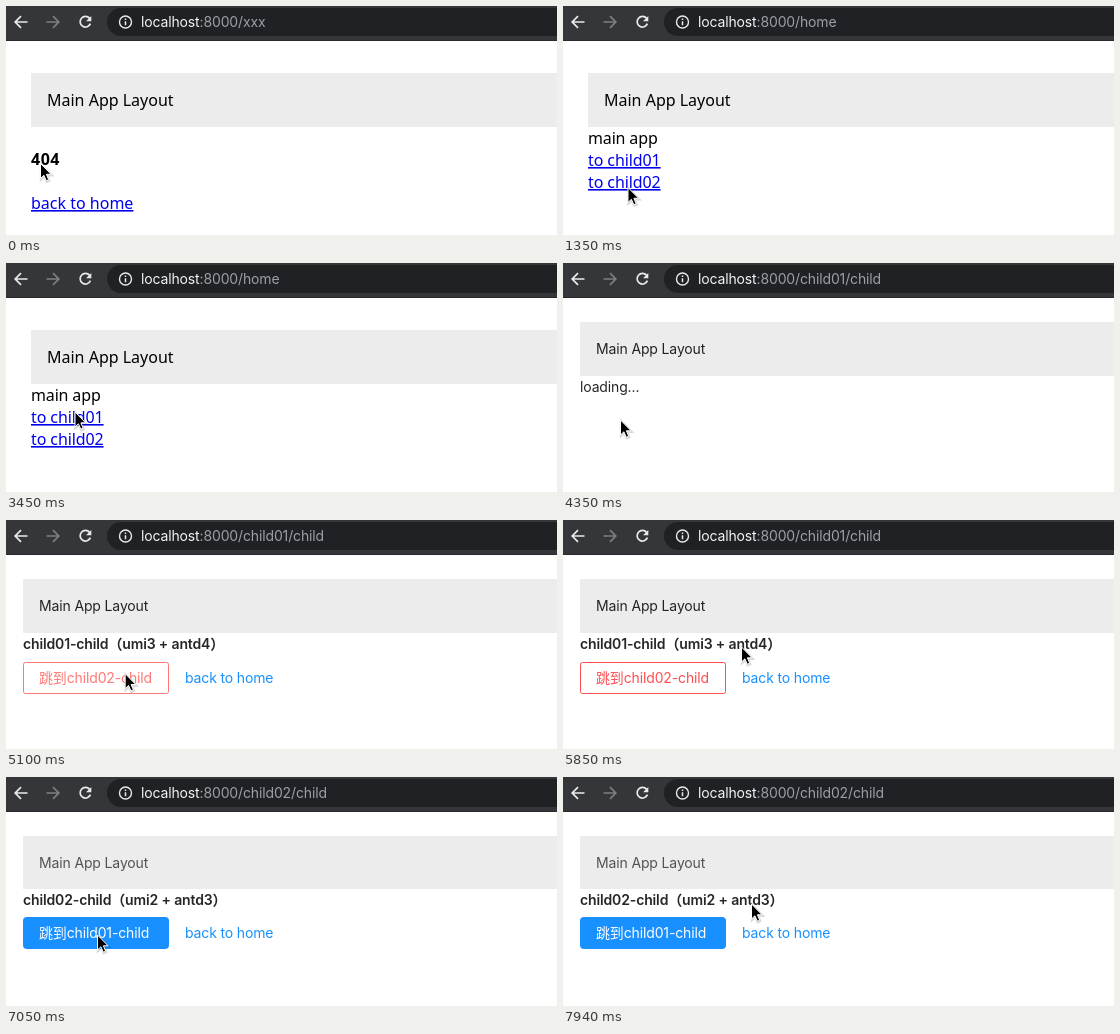
These frames come from a looping animation (551x229 px, 8 s). An HTML page:

```html
<!DOCTYPE html>
<html lang="en">
<head>
<meta charset="utf-8">
<title>Micro app navigation</title>
<style>
  html, body { margin: 0; width: 100%; height: 100%; overflow: hidden; background: #fff; }
  svg { display: block; width: 551px; height: 229px; }
  text { white-space: pre; }
  .plain { font: 16px "Noto Sans", "Open Sans", sans-serif; }
  .ui { font: 14px Inter, "Noto Sans CJK SC", "Noto Sans CJK", sans-serif; letter-spacing: -.14px; }
  .plain a, .link { fill: #00e; text-decoration: underline; }
  .bar { fill: #ececec; }
  .title { font-weight: 600; fill: rgba(0, 0, 0, .85); }
  .act { fill: #1890ff; }
  .act.hover { fill: #40a9ff; }
  .danger { --c: #ff4d4f; }
  .danger.hover { --c: #ff7875; }
  .danger rect { fill: #fff; stroke: var(--c); }
  .danger text { fill: var(--c); }
  .primary { --c: #1890ff; }
  .primary.hover { --c: #40a9ff; }
  .primary rect { fill: var(--c); }
  .primary text { fill: #fff; }
  .page { display: none; }
  .page.on { display: inline; }
  .icon { fill: none; stroke: #e8eaed; stroke-width: 1.7; }
</style>
</head>
<body>
<svg viewBox="0 0 551 229">
  <rect width="551" height="229" fill="#fff"/>

  <g id="toolbar">
    <rect width="551" height="35" fill="#35363a"/>
    <rect y="34" width="551" height="1" fill="#28292c"/>
    <rect x="101" y="2" width="480" height="28" rx="14" fill="#202124"/>
    <path class="icon" d="M21.5 16H9.5M15 10.2L9.2 16L15 21.8"/>
    <path class="icon" d="M40.5 16H52.5M47 10.2L52.8 16L47 21.8" style="stroke:#7d7e82"/>
    <path class="icon" d="M83.6 12.4A5.3 5.3 0 1 0 84.4 17.6"/>
    <path d="M85.3 10V15.2H80.1Z" fill="#e8eaed"/>
    <circle class="icon" cx="119.5" cy="16" r="6" style="stroke-width:1.4"/>
    <path class="icon" d="M119.5 15.2V19.2M119.5 12.6V14" style="stroke-width:1.5"/>
    <text class="ui" x="135" y="21" fill="#f1f3f4">localhost<tspan id="path" fill="#9aa0a6"></tspan></text>
  </g>

  <g id="missing" class="page plain">
    <rect class="bar" x="25" y="67" width="526" height="54"/>
    <text x="41" y="100">Main App Layout</text>
    <text x="25" y="159" font-weight="600" letter-spacing=".5">404</text>
    <text class="link" x="25" y="203">back to home</text>
  </g>

  <g id="home" class="page plain">
    <rect class="bar" x="25" y="67" width="526" height="54"/>
    <text x="41" y="100">Main App Layout</text>
    <text x="25" y="138" letter-spacing="-.15">main app</text>
    <text class="link" x="25" y="160" letter-spacing="-.1">to child01</text>
    <text class="link" x="25" y="182" letter-spacing="-.1">to child02</text>
  </g>

  <g id="wait" class="page plain">
    <rect class="bar" x="25" y="67" width="526" height="54"/>
    <text x="41" y="100">Main App Layout</text>
    <text x="25" y="138">loading...</text>
  </g>

  <g id="loading" class="page ui" fill="rgba(0,0,0,.85)">
    <rect class="bar" x="17" y="59" width="534" height="54"/>
    <text x="33" y="91">Main App Layout</text>
    <text x="17" y="129">loading...</text>
  </g>

  <g id="child01" class="page ui" fill="rgba(0,0,0,.85)">
    <rect class="bar" x="17" y="59" width="534" height="54"/>
    <text x="33" y="91">Main App Layout</text>
    <text class="title" x="17" y="129">child01-child（umi3 + antd4）</text>
    <g class="danger" data-hit="17 142 163 174">
      <rect x="17.5" y="142.5" width="145" height="31" rx="2"/>
      <text x="33" y="163">跳到child02-child</text>
    </g>
    <text class="act" data-hit="179 148 267 168" x="179" y="163">back to home</text>
  </g>

  <g id="child02" class="page ui" fill="rgba(0,0,0,.65)">
    <rect class="bar" x="17" y="59" width="534" height="53"/>
    <text x="33" y="91">Main App Layout</text>
    <text class="title" x="17" y="128">child02-child（umi2 + antd3）</text>
    <g class="primary" data-hit="17 140 163 172">
      <rect x="17" y="140" width="146" height="32" rx="4"/>
      <text x="33" y="161">跳到child01-child</text>
    </g>
    <text class="act" data-hit="179 146 267 166" x="179" y="161">back to home</text>
  </g>

  <g id="cursor">
    <path d="M0 0V15L3.4 11.8L5.8 17.2L8.2 16.2L5.9 10.8H10.6Z" transform="translate(.5 1)"
      fill="none" stroke="#000" stroke-opacity=".15" stroke-width="2.4"/>
    <path d="M0 0V15L3.4 11.8L5.8 17.2L8.2 16.2L5.9 10.8H10.6Z" stroke="#fff" stroke-width="1"/>
  </g>
</svg>
<script>
const LOOP = 8000, STEP = 150, LAST = 7940;
const $ = id => document.getElementById(id);

// [start, value]
const pages = [[0, 'missing'], [900, 'home'], [4200, 'wait'], [4350, 'loading'], [4500, 'child01'], [7050, 'child02']];
const paths = [[0, '/xxx'], [1050, '/home'], [4200, '/child01/child'], [7050, '/child02/child']];
// ms after a page appears before it reacts to the pointer
const HOVER_DELAY = 150;

// pointer track: time, x, y
const track = [
  [0, 34.5, 157.5], [300, 43, 172], [600, 59, 199], [1200, 59, 199],
  [1350, 65, 181.5], [1500, 64, 166], [1650, 64, 166],
  [1950, 105, 105], [2250, 180, 32], [2700, 247, 6],
  [3000, 205, 32], [3450, 69, 149], [3750, 56, 157.5], [3900, 57.5, 157],
  [4800, 57.5, 157], [5250, 150, 152], [5550, 205, 153], [5850, 178.5, 127],
  [6000, 165, 135], [6450, 91.5, 158], [7200, 91.5, 158],
  [7500, 140, 148], [LAST, 188.5, 127]
];

const current = (list, t) => list.filter(e => e[0] <= t).pop();

function pointerAt(t) {
  const i = track.findIndex(p => p[0] > t);
  if (i < 0) return track[track.length - 1].slice(1);
  const [t0, x0, y0] = track[i - 1], [t1, x1, y1] = track[i];
  const k = (t - t0) / (t1 - t0);
  return [x0 + (x1 - x0) * k, y0 + (y1 - y0) * k];
}

const pageEls = document.querySelectorAll('.page');
const targets = document.querySelectorAll('[data-hit]');

function draw(t) {
  const [start, name] = current(pages, t);
  const [x, y] = pointerAt(t);
  pageEls.forEach(el => el.classList.toggle('on', el.id === name));
  $('path').textContent = ':8000' + current(paths, t)[1];
  $('cursor').setAttribute('transform', `translate(${x} ${y})`);
  targets.forEach(el => {
    const [l, top, r, b] = el.dataset.hit.split(' ').map(Number);
    const over = x >= l && x <= r && y >= top && y <= b;
    el.classList.toggle('hover', over && t >= start + HOVER_DELAY);
  });
}

let origin, shown = -1;
function tick(now) {
  origin ??= now;
  const t = (now - origin) % LOOP;
  const step = t >= LAST ? LAST : Math.floor(t / STEP) * STEP;
  if (step !== shown) draw(shown = step);
  requestAnimationFrame(tick);
}
draw(0);
requestAnimationFrame(tick);
</script>
</body>
</html>
```
